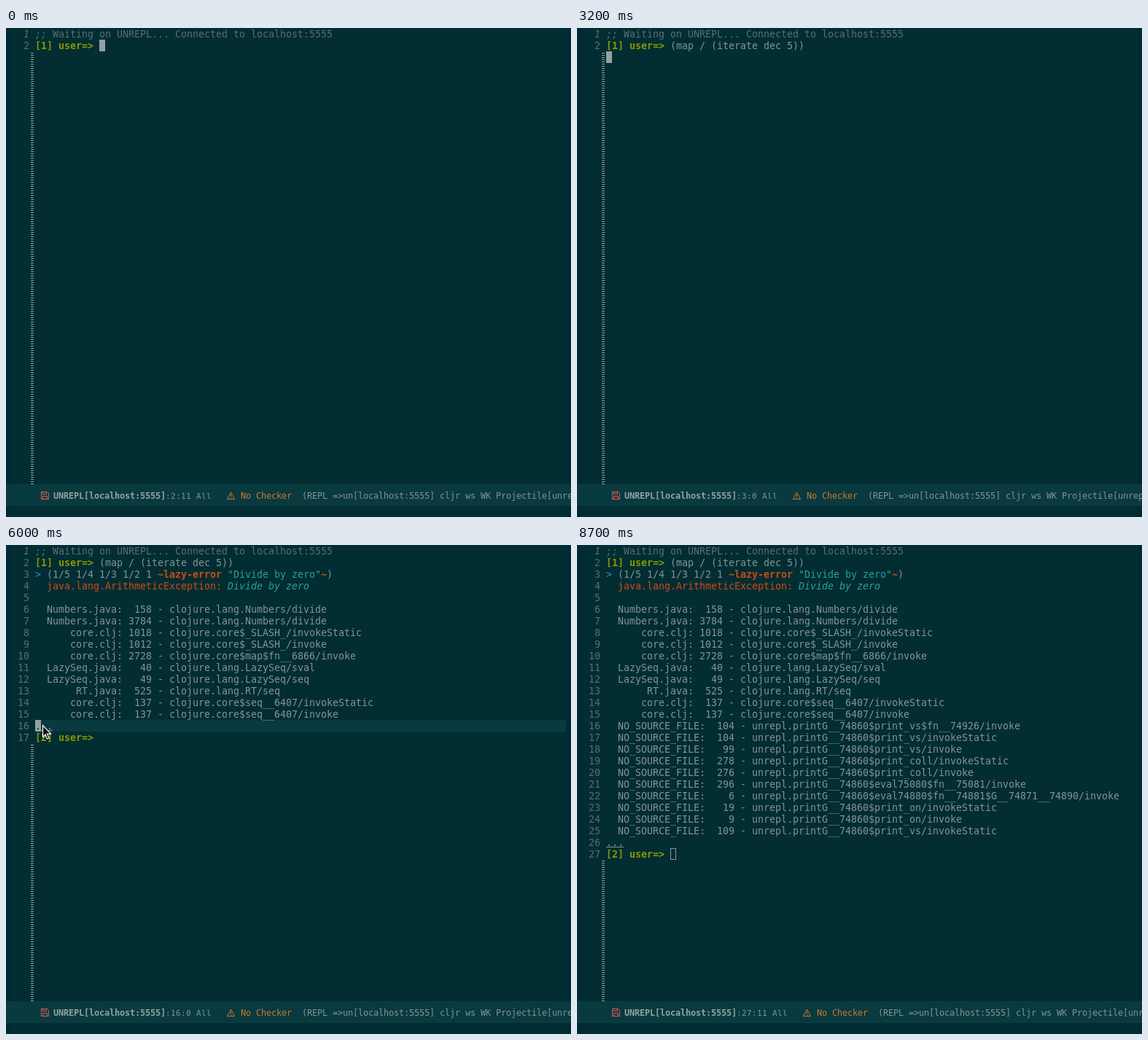
These frames come from a looping animation (775 by 671 pixels, 8.75 s). An HTML page with a canvas:

```html
<!DOCTYPE html>
<html lang="en">
<head>
<meta charset="utf-8">
<title>UNREPL session</title>
<style>
  html, body { margin: 0; width: 100%; height: 100%; overflow: hidden; background: #022d32; }
  canvas { display: block; }
</style>
</head>
<body>
<canvas id="stage" width="775" height="671"></canvas>
<script>
const ctx = document.getElementById('stage').getContext('2d');
const LOOP = 8750, LEFT = 40, CELL = 8, LINE = 16;
const BG = '#022d32', FRINGE = '#002b36', BAR = '#083a3f', TEXT = '#839496', DIM = '#586e75',
  GREEN = '#859900', ORANGE = '#cb4b16', CYAN = '#2aa198', BLUE = '#268bd2', LIGHT = '#93a1a1';

// Moments at which the session changes.
const PRINTED = 3500, INSPECTED = 4800, EXPANDED = 6200, AT_PROMPT = 6900, BLURRED = 8650;
const ENTER = 3200;
const CODE = '(map / (iterate dec 5';
const KEYS = [750, 850, 900, 1000, 1650, 1700, 1800, 1950, 2000, 2050, 2100,
  2200, 2300, 2350, 2450, 2650, 2750, 2800, 2900, 3000, 3150];

const POINTER = [
  [3650, 432, 290], [4000, 443, 150], [4350, 453, 67], [4500, 453, 67], [4700, 468, 42],
  [4900, 468, 42], [5150, 459, 103], [5250, 456, 110], [5400, 456, 110], [5600, 300, 200],
  [5750, 290, 204], [6000, 50, 247], [6400, 50, 247], [6700, 276, 394], [6900, 215, 424],
  [8000, 215, 424], [8650, 330, -20]
];

const frame = (file, line, fn) => [[`${file}:`.padStart(15) + String(line).padStart(5) + ' - ' + fn]];
const TRACE = [
  ['Numbers.java', 158, 'lang.Numbers/divide'],
  ['Numbers.java', 3784, 'lang.Numbers/divide'],
  ['core.clj', 1018, 'core$_SLASH_/invokeStatic'],
  ['core.clj', 1012, 'core$_SLASH_/invoke'],
  ['core.clj', 2728, 'core$map$fn__6866/invoke'],
  ['LazySeq.java', 40, 'lang.LazySeq/sval'],
  ['LazySeq.java', 49, 'lang.LazySeq/seq'],
  ['RT.java', 525, 'lang.RT/seq'],
  ['core.clj', 137, 'core$seq__6407/invokeStatic'],
  ['core.clj', 137, 'core$seq__6407/invoke']
].map(([file, line, fn]) => frame(file, line, 'clojure.' + fn));
const MORE = [
  [104, 'print_vs$fn__74926/invoke'],
  [104, 'print_vs/invokeStatic'],
  [99, 'print_vs/invoke'],
  [278, 'print_coll/invokeStatic'],
  [276, 'print_coll/invoke'],
  [296, 'eval75080$fn__75081/invoke'],
  [6, 'eval74880$fn__74881$G__74871__74890/invoke'],
  [19, 'print_on/invokeStatic'],
  [9, 'print_on/invoke'],
  [109, 'print_vs/invokeStatic']
].map(([line, fn]) => frame('  NO_SOURCE_FILE', line, 'unrepl.printG__74860$' + fn));

const prompt = n => [`[${n}] user=> `, GREEN, 'bold'];
const ELLIPSIS = [['...', TEXT, 'underline']];

function rect(x, y, w, h, color) {
  ctx.fillStyle = color;
  ctx.fillRect(x, y, w, h);
}

// Writes monospaced text on a fixed grid and returns the x where it ends.
function write(text, x, baseline, color, style = '', size = 13.3, cell = CELL) {
  const face = style === 'underline' ? '' : style;
  ctx.font = `${face} ${size}px "DejaVu Sans Mono", monospace`;
  ctx.fillStyle = color;
  [...text].forEach((char, i) => ctx.fillText(char, x + i * cell, baseline));
  const end = x + text.length * cell;
  if (style === 'underline') rect(x, baseline + 1, end - x, 1, color);
  return end;
}

function session(t) {
  const typed = KEYS.filter(k => k <= t).length;
  const open = CODE.slice(0, typed);
  const closers = ')'.repeat(open.split('(').length - 1);
  const rows = [
    [[';;', DIM, 'italic'], [' Waiting on UNREPL... Connected to localhost:5555', DIM]],
    [prompt(1), [open + closers]]
  ];
  const state = { rows, row: 1, col: 11 + typed, numbered: 2 };
  if (t < ENTER) {
    state.glow = [1, 1, 11, 11 + typed + closers.length];
    return state;
  }
  if (t < PRINTED) return { ...state, row: 2, col: 0 };

  const result = [['>', BLUE], [' (1/5 1/4 1/3 1/2 1 '], ['~lazy-error', ORANGE, 'bold'],
    [' '], ['"Divide by zero"', CYAN]];
  if (t < INSPECTED) result.push([' '], ['[Inspect]', TEXT, 'underline']);
  result.push(['~', ORANGE, 'bold'], [')']);
  rows.push(result);
  if (t >= INSPECTED) {
    rows.push([['  java.lang.ArithmeticException: ', ORANGE], ['Divide by zero', CYAN, 'italic']], [], ...TRACE);
    if (t >= EXPANDED) rows.push(...MORE);
    rows.push(ELLIPSIS);
  }
  rows.push([prompt(2)]);

  state.numbered = rows.length;
  state.row = rows.length - 1;
  state.col = 11;
  if (t >= INSPECTED && t < AT_PROMPT) {
    state.row--;
    state.col = t < EXPANDED ? 0 : 3;
    state.glow = [15, state.row, 0, 91];
    state.folded = t >= EXPANDED;
  }
  return state;
}

function drawBuffer({ rows, row, col, numbered, glow, folded }, hollow) {
  if (glow) {
    const [first, last, from, to] = glow;
    rect(LEFT + from * CELL, first * LINE, (to - from) * CELL, (last - first + 1) * LINE, BAR);
  }
  let cursorChar = '';
  rows.forEach((parts, i) => {
    const baseline = i * LINE + 13;
    let x = LEFT;
    for (const [text, color = TEXT, style] of parts) x = write(text, x, baseline, color, style);
    if (i === row) cursorChar = parts.map(p => p[0]).join('')[col] || '';
    if (folded && i > 15 && i <= row) return;
    const label = String(folded && i > row ? 17 : i + 1);
    write(label, 32 - label.length * CELL, baseline, DIM, i ? '' : 'italic');
  });
  for (let y = 1; y < 626; y += 3) if (y >= numbered * LINE) rect(34, y, 4, 1, LIGHT);

  const x = LEFT + col * CELL, y = row * LINE;
  if (hollow) {
    ctx.strokeStyle = TEXT;
    ctx.strokeRect(x + .5, y + .5, CELL - 1, LINE - 1);
  } else {
    rect(x, y, CELL, LINE, LIGHT);
    write(cursorChar, x, y + 13, BG);
  }
}

function stroke(path, color, width = 1) {
  ctx.strokeStyle = color;
  ctx.lineWidth = width;
  ctx.stroke(new Path2D(path));
  ctx.lineWidth = 1;
}

function drawModeLine(row, col) {
  rect(0, 626, 775, 30, BAR);
  const label = (text, x, color, style, size = 11.9) => write(text, x, 646, color, style, size, 7);
  stroke('M48.5 636.5h8l2 2v8h-10z M50.5 636.5v3h5v-3 M50.5 646.5v-4h6v4', '#d95757');
  let x = label('UNREPL[localhost:5555]', 65, LIGHT, 'bold');
  x = label(`:${row + 1}:${col} All`, x, TEXT, '', 11);
  ctx.save();
  ctx.translate(x + 21, 636);
  stroke('M5.5 1L10.5 10.5H.5z M5.5 4v3.3 M5.5 8v1.2', '#cb7832');
  ctx.restore();
  label('No Checker', x + 40, '#cb7832');
  label('(REPL =>un[localhost:5555] cljr ws WK Projectile[unrepl]', x + 124, TEXT);
}

function drawPointer(t, rows) {
  const next = POINTER.findIndex(p => p[0] > t);
  if (next < 1) return;
  const [t0, x0, y0] = POINTER[next - 1], [t1, x1, y1] = POINTER[next];
  const u = (t - t0) / (t1 - t0), ease = u * u * (3 - 2 * u);
  const x = Math.round(x0 + (x1 - x0) * ease), y = Math.round(y0 + (y1 - y0) * ease);
  const line = rows[Math.floor(y / LINE)] || [];
  const length = line.reduce((sum, part) => sum + part[0].length, 0);
  const overLink = line.some(part => part[2] === 'underline');
  ctx.save();
  ctx.translate(x, y);
  if (x < LEFT + length * CELL && !overLink) {
    const beam = 'M-3 -6.5h2.5l.5 .5l.5 -.5h2.5 M0 -6v13 M-3 7.5h2.5l.5 -.5l.5 .5h2.5';
    stroke(beam, '#000', 3);
    stroke(beam, '#fff', 1.3);
  } else {
    const arrow = 'M.5 .5V16.5L4 13L6.5 19L9 18L6.5 12.2H11.5z';
    ctx.fillStyle = '#0a0a0a';
    ctx.fill(new Path2D(arrow));
    stroke(arrow, '#fff', 1.2);
  }
  ctx.restore();
}

function draw(now) {
  const t = now % LOOP;
  const state = session(t);
  rect(0, 0, 775, 671, BG);
  rect(0, 0, 8, 671, FRINGE);
  rect(768, 0, 7, 671, FRINGE);
  drawBuffer(state, t >= BLURRED);
  drawModeLine(state.row, state.col);
  drawPointer(t, state.rows);
  requestAnimationFrame(draw);
}
requestAnimationFrame(draw);
</script>
</body>
</html>
```
